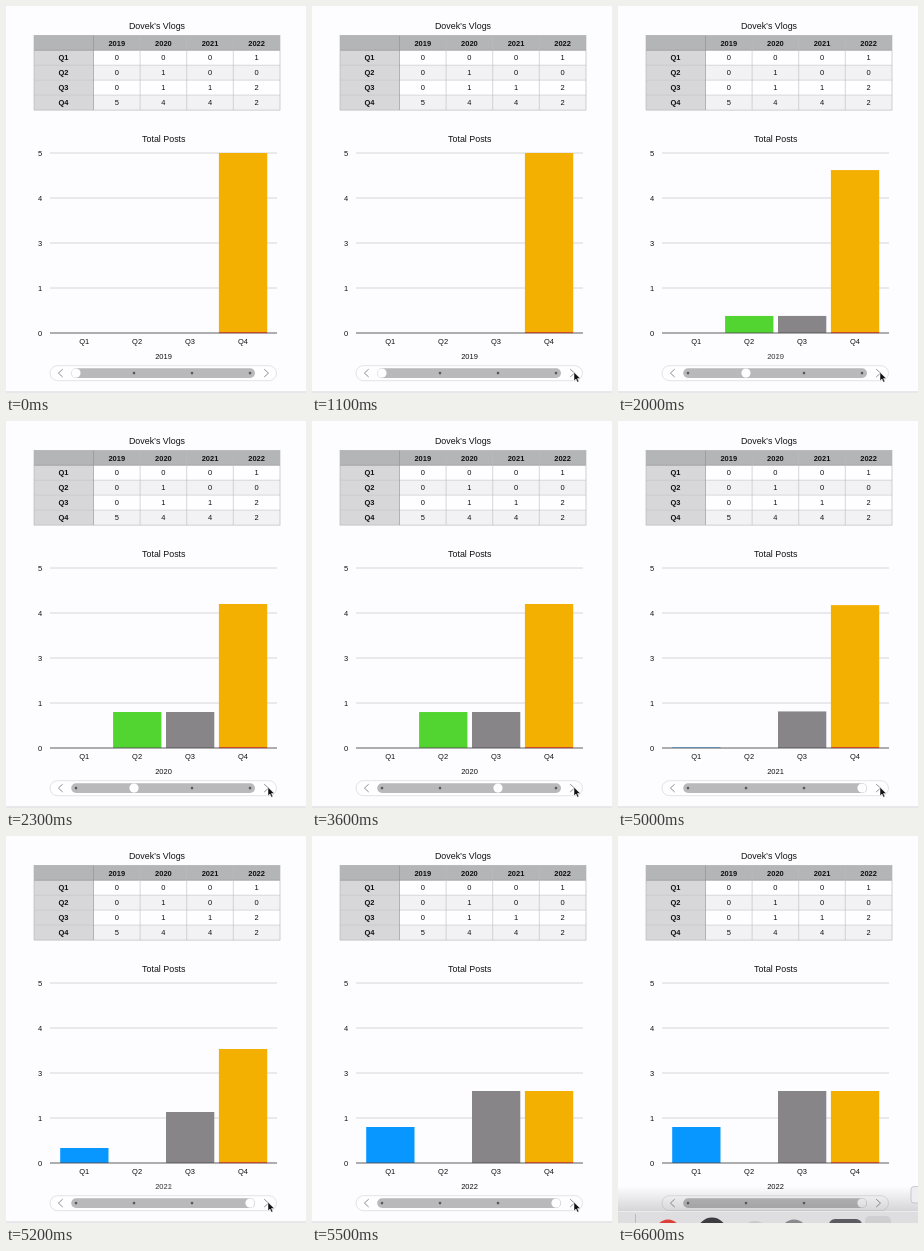
Write an HTML page that moves like this. It is 300 px wide and 387 px high and loops after 7.8 s.

```html
<!DOCTYPE html>
<html lang="en">
<head>
<meta charset="utf-8">
<title>Vlog chart</title>
<style>
html, body { margin: 0; width: 100%; height: 100%; overflow: hidden; background: #fdfcff; }
svg { display: block; width: 100vw; height: 100vh; }
text { font: 7.5px "Liberation Sans", Arial, sans-serif; fill: #111; text-anchor: middle; }
.title { font-size: 8.9px; }
.bold { font-weight: bold; }
</style>
</head>
<body>
<svg id="stage" viewBox="0 0 300 387"></svg>
<script>
const NS = "http://www.w3.org/2000/svg";
const stage = document.getElementById("stage");
const LOOP = 7800, STEP = 100;

function add(tag, attrs, parent = stage) {
  const el = document.createElementNS(NS, tag);
  set(el, attrs);
  parent.appendChild(el);
  return el;
}
function set(el, attrs) {
  for (const k in attrs) el.setAttribute(k, attrs[k]);
}
function rect(x, y, width, height, fill, more = {}, parent = stage) {
  return add("rect", { x, y, width, height, fill, ...more }, parent);
}
function line(x1, y1, x2, y2, stroke, w = 0.7, parent = stage) {
  return add("line", { x1, y1, x2, y2, stroke, "stroke-width": w }, parent);
}
function dot(cx, cy, r, fill, parent = stage) {
  return add("circle", { cx, cy, r, fill }, parent);
}
function label(str, x, y, cls = "") {
  const el = add("text", { x, y, class: cls });
  el.textContent = str;
  return el;
}

const years = [2019, 2020, 2021, 2022];
const quarters = ["Q1", "Q2", "Q3", "Q4"];
const posts = [[0, 0, 0, 1], [0, 1, 0, 0], [0, 1, 1, 2], [5, 4, 4, 2]];
const colors = ["#0896ff", "#52d530", "#878588", "#f4b000"];
const BASE = 327, UNIT = 36;

rect(0, 0, 300, 387, "#fdfcff");

// Table
label("Dovek’s Vlogs", 151, 23, "title");
const colX = i => 87.5 + i * 46.6;
const rowY = i => 29.3 + i * 14.95;
rect(28, 29.3, 246, 74.8, "#fefdff");
for (const r of [2, 4]) rect(28, rowY(r), 246, 14.95, "#f2f1f4");
rect(28, 29.3, 59.5, 74.8, "#d7d6d9");
rect(28, 29.3, 246, 14.95, "#b4b5b6");
for (let r = 1; r < 5; r++) line(28, rowY(r), 274, rowY(r), r === 1 ? "#8f8f91" : "#c3c2c5", 0.6);
for (let c = 0; c < 4; c++) line(colX(c), 29.3, colX(c), 104.1, c ? "#bdbcbf" : "#8f8f91", 0.6);
rect(28, 29.3, 246, 74.8, "none", { stroke: "#b2b1b4", "stroke-width": 0.6 });
years.forEach((y, c) => label(y, colX(c) + 23.3, 39.6, "bold"));
quarters.forEach((q, r) => {
  const y = rowY(r + 1) + 10.1;
  label(q, 57.5, y, "bold");
  posts[r].forEach((n, c) => label(n, colX(c) + 23.3, y));
});

// Chart
label("Total Posts", 157.8, 136.3, "title");
[5, 4, 3, 1, 0].forEach((n, i) => {
  const y = 147 + i * 45;
  label(n, 34, y + 2.7);
  if (i < 4) line(44, y, 271, y, "#d2d1d4", 0.9);
});
const bars = quarters.map((q, i) => {
  label(q, 78.2 + i * 52.9, 337.6);
  return rect(54.2 + i * 52.9, BASE, 48.3, 0, colors[i]);
});
line(44, BASE, 271, BASE, "#4c4b4d", 0.9);
line(213, BASE - 0.4, 261, BASE - 0.4, "#cf3f2a", 0.9);
const yearOut = label("", 157.5, 352.9);
const yearIn = label("", 157.5, 352.9);

// Slider
const stopX = i => 70 + i * 58;
rect(44, 359.7, 226.5, 15, "#fefdff", { rx: 7.5, stroke: "#dcdbde", "stroke-width": 0.8 });
rect(65.2, 362.2, 183.8, 9.8, "#b9b8ba", { rx: 4.9 });
years.forEach((y, i) => dot(stopX(i), 367.1, 1.3, "#59585a"));
const thumb = dot(stopX(0), 367.1, 4.6, "#fefdff");
for (const d of ["M56.7 363.2L52.4 367.1L56.7 371", "M258.2 363.2L262.5 367.1L258.2 371"])
  add("path", { d, fill: "none", stroke: "#918f93", "stroke-width": 1 });
line(0, 386, 300, 386, "#d3d2d5", 1);

// Dock sliding up at the bottom edge
const shade = add("linearGradient", { id: "shade", x1: 0, y1: 0, x2: 0, y2: 1 }, add("defs", {}));
add("stop", { offset: 0, "stop-color": "#555", "stop-opacity": 0 }, shade);
add("stop", { offset: 1, "stop-color": "#555", "stop-opacity": 0.24 }, shade);
const dock = add("g", {});
rect(0, 350, 300, 25.5, "url(#shade)", {}, dock);
rect(0, 375.5, 300, 24, "#dedddf", {}, dock);
line(0, 375.5, 300, 375.5, "#eeedf0", 0.8, dock);
line(17.5, 378, 17.5, 395, "#b3b2b5", 0.8, dock);
dot(50, 396, 12.5, "#dc4038", dock);
dot(94, 396, 14.5, "#3d3c40", dock);
dot(137, 399, 14, "#c9c8cb", dock);
dot(176, 397, 13.5, "#8a898d", dock);
rect(211, 383, 33, 20, "#5c5b5f", { rx: 6 }, dock);
rect(247, 380, 26, 20, "#cfced1", { rx: 5 }, dock);
rect(293, 350.5, 14, 16.5, "#eeedf0", { rx: 3, stroke: "#b9b8bb", "stroke-width": 0.7 }, dock);

const cursor = add("path", {
  d: "M0 0V8.6L2 6.8L3.4 10L4.9 9.4L3.5 6.3H6.3Z",
  fill: "#111", stroke: "#fff", "stroke-width": 0.5
});

// Start and end of each change of year
const moves = [[1720, 2300], [3590, 4100], [4960, 5500]];
const clamp = v => Math.min(1, Math.max(0, v));
const smooth = k => k * k * (3 - 2 * k);

function draw(t) {
  const next = moves.filter(m => t > m[0]).length;
  const prev = Math.max(0, next - 1);
  const [from, to] = moves[prev];
  const p = next ? smooth(clamp((t - from) / (to - from))) : 1;

  bars.forEach((bar, i) => {
    const h = UNIT * (posts[i][prev] + (posts[i][next] - posts[i][prev]) * p);
    set(bar, { y: BASE - h, height: h });
  });
  yearOut.textContent = years[prev];
  yearIn.textContent = years[next];
  set(yearOut, { opacity: 1 - p });
  set(yearIn, { opacity: p });
  set(thumb, { cx: stopX(next) });

  const k = 1 - (1 - clamp((t - 400) / 400)) ** 1.4;
  const x = 265.5 - 3.5 * k - 5 * Math.sin(Math.PI * k);
  set(cursor, {
    transform: `translate(${x} ${382 - 15.8 * k})`,
    visibility: t >= 400 && t < 6100 ? "visible" : "hidden"
  });

  const rise = clamp((t - 6400) / 200);
  set(dock, { opacity: rise, transform: `translate(0 ${8 * (1 - rise)})` });
}

const begin = performance.now();
function tick() {
  const t = (performance.now() - begin) % LOOP;
  draw(Math.floor(t / STEP) * STEP);
  requestAnimationFrame(tick);
}
tick();
</script>
</body>
</html>
```
